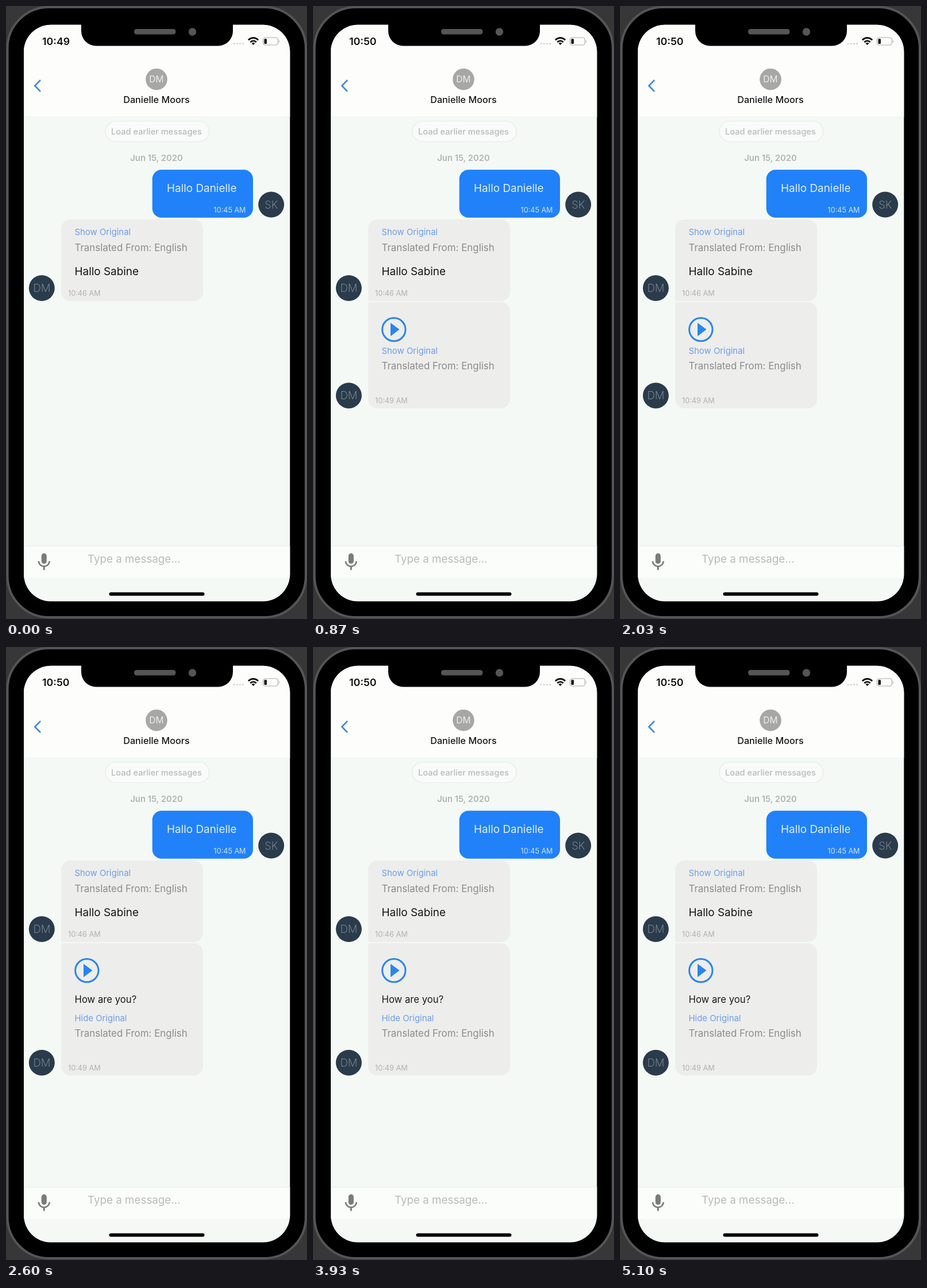
An HTML page for the animation above (5.16 s loop, 524 by 1068 pixels).

```html
<!DOCTYPE html>
<html lang="en">
<head>
<meta charset="utf-8">
<title>Translated chat</title>
<style>
  html, body { margin: 0; width: 100%; height: 100%; overflow: hidden; background: #373737; }
  svg { display: block; width: 524px; height: 1068px; filter: blur(0.5px); }
  text { font-family: Inter, "Liberation Sans", sans-serif; white-space: pre; }
</style>
</head>
<body>
<svg id="stage" viewBox="0 0 524 1068" xmlns="http://www.w3.org/2000/svg"></svg>
<script>
const LOOP = 5160;
const MESSAGE_AT = 400;
const MINUTE_AT = 570;
const EXPAND_AT = 2400;

const GREY = '#ededec', LINK = '#6c9de9', NOTE = '#8b8c8b', STAMP = '#b0b1b0', BLUE = '#2081f9';
const middle = { 'text-anchor': 'middle' };
const end = { 'text-anchor': 'end' };
const stage = document.getElementById('stage');

function add(tag, attrs, parent = stage) {
  const el = document.createElementNS('http://www.w3.org/2000/svg', tag);
  for (const key in attrs) el.setAttribute(key, attrs[key]);
  parent.appendChild(el);
  return el;
}

function label(str, x, y, size, fill, opts = {}, parent = stage) {
  const el = add('text', { x, y, 'font-size': size, fill, ...opts }, parent);
  el.textContent = str;
  return el;
}

function box(x, y, width, height, rx, fill, opts = {}, parent = stage) {
  return add('rect', { x, y, width, height, rx, fill, ...opts }, parent);
}

// Corner radii run clockwise from the top left.
function bubblePath(x, y, w, h, [a, b, c, d]) {
  return `M${x + a} ${y}H${x + w - b}a${b} ${b} 0 0 1 ${b} ${b}V${y + h - c}` +
    `a${c} ${c} 0 0 1 ${-c} ${c}H${x + d}a${d} ${d} 0 0 1 ${-d} ${-d}V${y + a}` +
    `a${a} ${a} 0 0 1 ${a} ${-a}Z`;
}

function avatar(initials, x, y, parent = stage) {
  const g = add('g', { transform: `translate(${x} ${y})` }, parent);
  add('circle', { r: 22.5, fill: '#2a3b4b' }, g);
  label(initials, 0, 6.7, 18.5, '#959fa6', { ...middle, 'font-weight': 200 }, g);
}

// Phone body and screen
box(2.5, 2, 519.5, 1063, 72, '#000', { stroke: '#555', 'stroke-width': 4 });
const clip = add('clipPath', { id: 'screen' });
box(31, 32.8, 463.3, 1004.5, 47, '#fff', {}, clip);
const screen = add('g', { 'clip-path': 'url(#screen)' });
box(30, 32, 466, 1007, 0, '#f4f9f6', {}, screen);
box(30, 32, 466, 161, 0, '#fdfefc', {}, screen);
box(30, 192.5, 466, 1, 0, '#eff3f1', {}, screen);
box(30, 941, 466, 55, 0, '#fbfdfb', {}, screen);
box(30, 940.5, 466, 1, 0, '#e7ecea', {}, screen);

// Notch
add('path', { d: 'M131 30V43.5a26 26 0 0 0 26 26H369a26 26 0 0 0 26 -26V30Z', fill: '#000' });
box(223, 40, 72.5, 9.5, 4.5, '#555');
add('circle', { cx: 324.5, cy: 45, r: 6.7, fill: '#555' });

// Status bar
const clock = label('10:49', 63, 68, 17.8, '#111', { 'font-weight': 600 });
for (let i = 0; i < 4; i++) add('circle', { cx: 397 + i * 5.2, cy: 65.5, r: 1.5, fill: '#d2d4d3' });
const wifi = add('g', { fill: 'none', stroke: '#111', 'stroke-width': 2.7 });
add('path', { d: 'M421.8 59.2Q430.5 51.8 439.2 59.2M425.2 62.9Q430.5 58.4 435.8 62.9' }, wifi);
add('path', { d: 'M430.5 68L427.5 65Q430.5 62.6 433.5 65Z', fill: '#111', stroke: 'none' }, wifi);
box(447.5, 55, 26, 13, 4, 'none', { stroke: '#a9abaa', 'stroke-width': 1.2 });
box(449.5, 57, 4.5, 9, 1.5, '#111');
add('path', { d: 'M475.3 59.5q2.4 2 0 4.5Z', fill: '#a9abaa' });

// Header
add('path', { d: 'M60 129L50.3 139L60 149', fill: 'none', stroke: '#3f88de', 'stroke-width': 2.6 });
add('circle', { cx: 262, cy: 127.7, r: 18.8, fill: '#a6a7a6' });
label('DM', 262, 132.8, 15.6, '#eceeed', middle);
label('Danielle Moors', 262, 169, 16.2, '#171818', { ...middle, 'font-weight': 500 });

// List top
box(173, 200.5, 181, 36, 18, '#f8fbf9', { stroke: '#e6ebe8', 'stroke-width': 1.2 });
label('Load earlier messages', 262, 224, 14.6, '#b9bbba', { ...middle, 'font-weight': 500 });
label('Jun 15, 2020', 262, 270, 14.8, '#b2b4b3', { ...middle, 'font-weight': 600 });

// Sent message
add('path', { d: bubblePath(254.7, 285.2, 175.3, 83.6, [16, 16, 16, 16]), fill: BLUE });
label('Hallo Danielle', 280, 324, 18.9, '#e2efff');
label('10:45 AM', 417.5, 360, 12.6, '#cfe2ff', end);
avatar('SK', 461.7, 346);

// First reply
const first = add('path', { fill: GREY });
label('Show Original', 119.5, 399.3, 14.9, LINK);
label('Translated From: English', 119.5, 426.5, 16.9, NOTE);
label('Hallo Sabine', 119.5, 469, 18.9, '#151515');
label('10:46 AM', 108, 504.5, 12.7, STAMP);
avatar('DM', 62.3, 491.5);

// Voice reply
const voice = add('g', {});
const second = add('path', { fill: GREY }, voice);
add('circle', { cx: 140.8, cy: 563.6, r: 20.2, fill: 'none', stroke: '#2a85ec', 'stroke-width': 3 }, voice);
add('path', { d: 'M135 552L150.5 563.6L135 575.2Z', fill: '#2a85ec' }, voice);
const spoken = label('How are you?', 119.5, 619.5, 16.7, '#1a1a1a', {}, voice);
const lower = add('g', {}, voice);
const toggle = label('Show Original', 119.5, 606, 14.9, LINK, {}, lower);
label('Translated From: English', 119.5, 633.3, 16.9, NOTE, {}, lower);
label('10:49 AM', 108, 692, 12.7, STAMP, {}, lower);
avatar('DM', 62.3, 678.7, lower);

// Input bar
add('path', {
  transform: 'translate(48 950.5) scale(1.52)', fill: '#7a7b7a',
  d: 'M12 14a3 3 0 0 0 3-3V5a3 3 0 0 0-6 0v6a3 3 0 0 0 3 3zM17.3 11a5.3 5.1 0 0 1-10.6 0H5' +
    'c0 3.4 2.7 6.2 6 6.7V21h2v-3.3c3.3-.5 6-3.3 6-6.7z'
});
label('Type a message...', 142, 969.7, 18.8, '#b9bbba');
box(179.5, 1021.5, 166, 6, 3, '#000');

function render(t) {
  const arrived = t >= MESSAGE_AT;
  const open = t >= EXPAND_AT;
  const shift = open ? 45.5 : 0;
  clock.textContent = t >= MINUTE_AT ? '10:50' : '10:49';
  first.setAttribute('d', bubblePath(96, 372, 247, 142, [16, 16, 16, arrived ? 4 : 16]));
  voice.style.display = arrived ? '' : 'none';
  second.setAttribute('d', bubblePath(96, 516, 247, 185 + shift, [4, 16, 16, 16]));
  spoken.style.display = open ? '' : 'none';
  toggle.textContent = open ? 'Hide Original' : 'Show Original';
  lower.setAttribute('transform', `translate(0 ${shift})`);
}

const start = performance.now();
function tick() {
  render((performance.now() - start) % LOOP);
  requestAnimationFrame(tick);
}
render(0);
requestAnimationFrame(tick);
</script>
</body>
</html>
```
